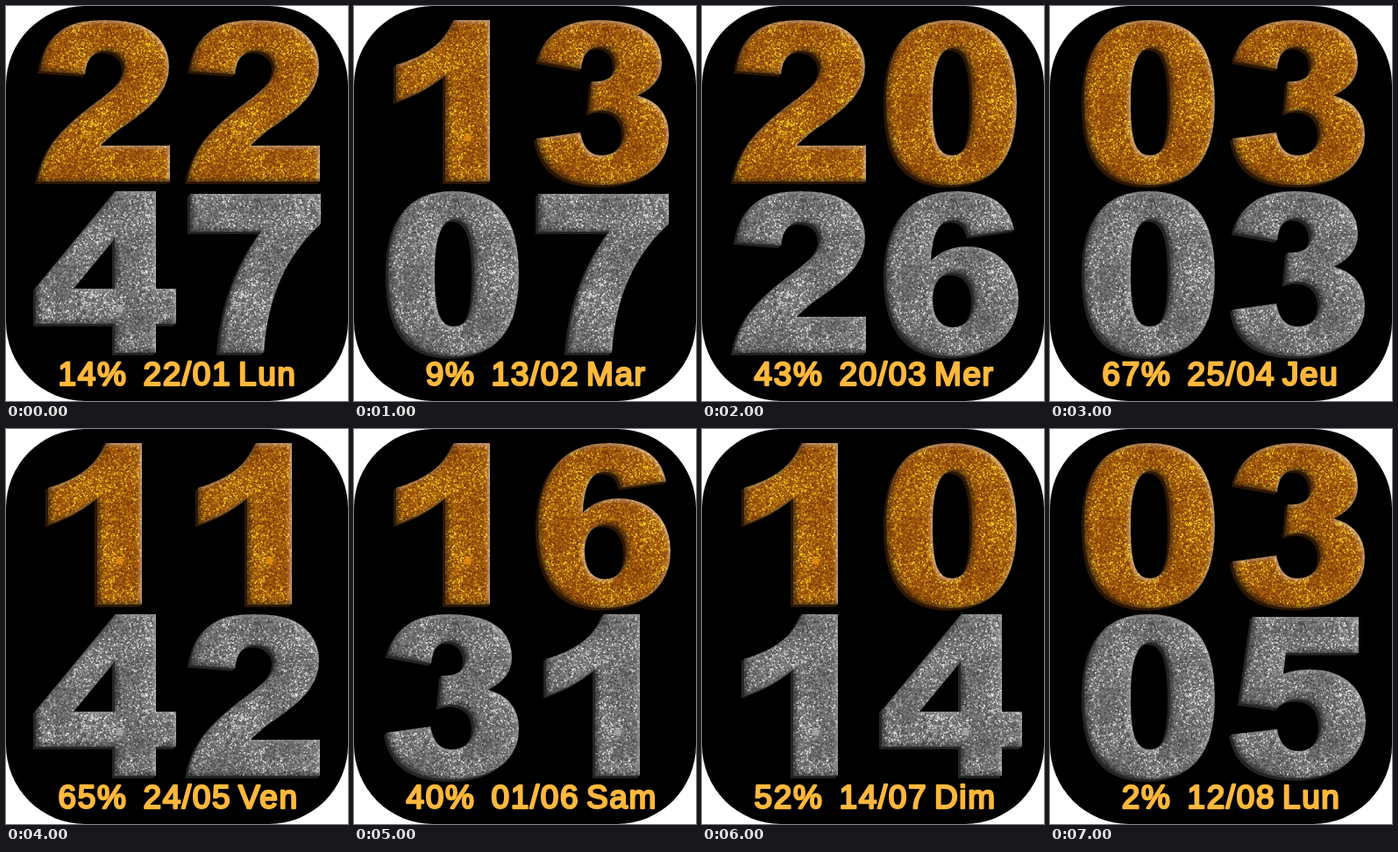
Recreate the animation shown at these times as an HTML page with a canvas. Size 390 by 450 pixels, loop 8000 ms.

```html
<!DOCTYPE html>
<html lang="fr">
<head>
<meta charset="utf-8">
<title>Glitter clock</title>
<style>
  html, body { margin: 0; height: 100%; overflow: hidden; background: #fff; }
  canvas { display: block; }
</style>
</head>
<body>
<canvas id="stage" width="390" height="450"></canvas>
<script>
const ctx = document.getElementById('stage').getContext('2d');
const STEP = 1000, COLUMN = 171, ROW = 195;

const screens = [
  ['2247', '14%', '22/01', 'Lun'],
  ['1307', '9%', '13/02', 'Mar'],
  ['2026', '43%', '20/03', 'Mer'],
  ['0303', '67%', '25/04', 'Jeu'],
  ['1142', '65%', '24/05', 'Ven'],
  ['1631', '40%', '01/06', 'Sam'],
  ['1014', '52%', '14/07', 'Dim'],
  ['0305', '2%', '12/08', 'Lun'],
];

// Digit outlines, placed in the top left cell
const outlines = [
  'M113 16C164 16 188 46 188 110C188 174 164 204 113 204C62 204 39 174 39 110C39 46 62 16 113 16ZM114 48C100 48 92 70 92 109C92 152 97 170 114 170C131 170 137 152 137 109C137 68 131 48 114 48Z',
  'M114 16H155V200H104V79C88 92 72 101 48 109V67C85 56 103 41 114 16Z',
  'M39 74Q42 53 50 41Q58 29 73 22Q87 16 112 16Q139 16 154 22Q168 28 177 40Q186 53 186 69Q186 85 176 100Q166 115 140 133Q125 143 120 148Q115 152 108 159H187V200H36Q39 178 52 158Q65 138 101 111Q123 95 129 87Q135 78 135 71Q135 62 129 57Q123 51 113 51Q104 51 98 57Q92 62 90 78Z',
  'M39 63C46 32 68 16 108 16C157 16 180 35 180 65C180 82 170 94 152 102C176 108 188 124 188 147C188 181 160 204 112 204C66 204 43 186 37 151L87 144C91 162 98 170 111 170C127 170 137 160 137 144C137 129 127 119 112 119C107 119 103 120 97 122L100 86C116 87 127 81 127 67C127 54 119 47 108 47C96 47 90 55 88 72Z',
  'M125 16H171V127H194V167H171V200H124V167H34V126ZM124 70L77 127H124Z',
  'M60 19H181V60H98L95 84C106 80 115 79 126 79C165 79 189 102 189 138C189 177 160 203 112 203C66 203 43 186 36 153L88 147C91 164 99 172 112 172C128 172 138 160 138 142C138 122 127 113 112 113C102 113 95 116 88 123L46 117Z',
  'M185 60L134 67C131 55 126 49 115 49C99 49 92 64 90 95C102 84 115 79 131 79C167 79 190 104 190 139C190 178 161 204 115 204C64 204 39 172 39 112C39 49 68 16 119 16C158 16 179 30 185 60ZM115 109C101 109 92 121 92 140C92 159 101 171 115 171C130 171 139 159 139 140C139 121 130 109 115 109Z',
  'M39 19H188V53C150 88 128 132 123 200H72C75 155 87 108 120 62H39Z',
];

const gold = {
  base: '#9a520e', side: '#2f1804', light: 'rgba(245,215,195,.75)', spot: '#e08a10',
  specks: ['#763606', '#8a4408', '#98500c', '#ac640e', '#bd7812', '#d69a18', '#fbd828'],
};
const silver = {
  base: '#6c6c6c', side: '#262626', light: 'rgba(205,205,205,.6)', spot: '#a4a4a4',
  specks: ['#484848', '#585858', '#686868', '#7a7a7a', '#8c8c8c', '#a8a8a8', '#ececec'],
};

function layer(width, height) {
  const canvas = document.createElement('canvas');
  canvas.width = width;
  canvas.height = height;
  return canvas.getContext('2d');
}

function seeded(seed) {
  return () => (seed = (seed * 16807) % 2147483647) / 2147483647;
}

function glitter({ base, specks }) {
  const g = layer(200, 210), random = seeded(4711);
  g.fillStyle = base;
  g.fillRect(0, 0, 200, 210);
  for (let i = 0; i < 22000; i++) {
    const x = random() * 200, y = random() * 210;
    const patch = 0.14 * Math.sin(x / 17 + y / 29) * Math.sin(y / 19 - x / 41);
    const level = Math.min(0.99, Math.max(0, random() + patch));
    g.fillStyle = specks[level * specks.length | 0];
    g.fillRect(x, y, 1 + random(), 1 + random());
  }
  return g.canvas;
}

function innerShade(g, inverse, color, dx, dy, blur) {
  g.shadowColor = color;
  g.shadowOffsetX = dx;
  g.shadowOffsetY = dy;
  g.shadowBlur = blur;
  g.fill(inverse, 'evenodd');
}

function makeDigit(outline, digit, material, texture) {
  const g = layer(200, 210), shape = new Path2D(outline);
  const inverse = new Path2D(outline);
  inverse.rect(-50, -50, 300, 310);

  g.fillStyle = material.side;
  for (let depth = 3; depth > 0; depth -= 0.5) {
    g.setTransform(1, 0, 0, 1, -depth, depth * 0.9);
    g.fill(shape, 'evenodd');
  }
  g.resetTransform();
  g.clip(shape, 'evenodd');
  g.drawImage(texture, 0, 0);

  if (digit === 1 || digit === 4) {
    g.fillStyle = g.shadowColor = material.spot;
    g.shadowBlur = 4;
    g.beginPath();
    g.arc(130, 150.5, 3.5, 0, 7);
    g.fill();
  }
  g.fillStyle = material.side;
  innerShade(g, inverse, material.light, -2, 2, 5);
  innerShade(g, inverse, 'rgba(0,0,0,.6)', 3, -2, 6);
  return g.canvas;
}

const [goldDigits, silverDigits] = [gold, silver].map(material => {
  const texture = glitter(material);
  return outlines.map((outline, digit) => makeDigit(outline, digit, material, texture));
});

// A round outline on the regular weight gives bold letters with soft ends
function label(text, x, align) {
  ctx.textAlign = align;
  ctx.strokeText(text, x, 432);
  ctx.fillText(text, x, 432);
}

function drawScreen([time, charge, date, day]) {
  ctx.clearRect(0, 0, 390, 450);
  ctx.fillStyle = '#000';
  ctx.beginPath();
  ctx.roundRect(0, 0, 390, 450, 90);
  ctx.fill();

  [...time].forEach((digit, i) => {
    const row = i >> 1;
    ctx.drawImage((row ? silverDigits : goldDigits)[digit], (i % 2) * COLUMN, row * ROW);
  });

  ctx.font = '37px "Liberation Sans", Arial, sans-serif';
  ctx.letterSpacing = '1.6px';
  ctx.fillStyle = ctx.strokeStyle = '#ffb83c';
  ctx.lineWidth = 2.4;
  ctx.lineJoin = 'round';
  label(charge, 138.4, 'right');
  label(date, 156.5, 'left');
  label(day, 265, 'left');
}

let shown = -1;
function tick() {
  const index = Math.floor(performance.now() / STEP) % screens.length;
  if (index !== shown) drawScreen(screens[shown = index]);
  requestAnimationFrame(tick);
}
tick();
</script>
</body>
</html>
```
